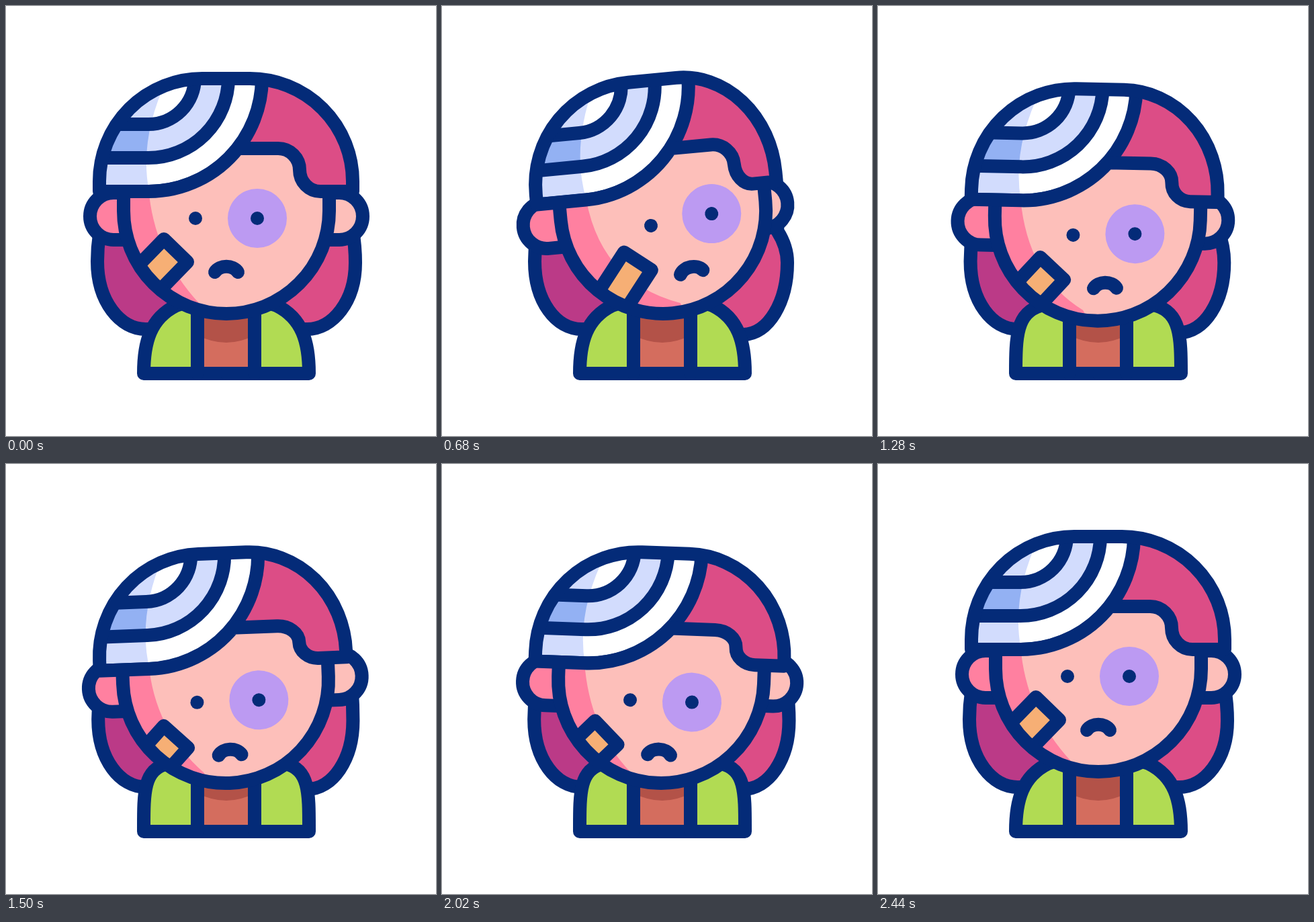
Write an HTML page with a canvas that moves like this. It is 640 by 640 pixels and loops after 2.6 s.

```html
<!DOCTYPE html>
<html lang="en">
<head>
<meta charset="utf-8">
<title>Injured girl</title>
<style>
  html, body { margin: 0; width: 100%; height: 100%; overflow: hidden; background: #fff; }
  canvas { display: block; width: 640px; height: 640px; }
</style>
</head>
<body>
<canvas id="stage" width="640" height="640"></canvas>
<script>
const LOOP = 2600;
const NAVY = '#042b78', SKIN = '#fdbfba', BLUSH = '#ff80a0', HAIR = '#dc4d86', HAIR_DARK = '#bb3a87';
const GREEN = '#b1db53', PALE = '#d2dcfd', BLUE = '#93b1f3';
const ctx = document.getElementById('stage').getContext('2d');

// Head motion as [ms, value]: turn to the side, nod down, roll in degrees
const YAW = [[100, 0], [700, 1], [960, 1], [1540, 0]];
const NOD = [[1000, 0], [1480, 1], [2010, 1], [2440, 0]];
const ROLL = [[100, 0], [700, -5.5], [960, -5.5], [1280, 1.3], [1700, -5.2], [2020, 2.1], [2440, 0]];

function ease(keys, t) {
  const i = keys.findIndex(k => k[0] > t);
  if (i < 0) return keys[keys.length - 1][1];
  if (i === 0) return keys[0][1];
  const [[t0, a], [t1, b]] = [keys[i - 1], keys[i]];
  const u = (t - t0) / (t1 - t0);
  return a + (b - a) * u * u * (3 - 2 * u);
}

function fill(d, color) {
  ctx.fillStyle = color;
  ctx.fill(new Path2D(d));
}

function line(d, color = NAVY, width = 20) {
  ctx.strokeStyle = color;
  ctx.lineWidth = width;
  ctx.stroke(new Path2D(d));
}

function shape(d, color) {
  fill(d, color);
  line(d);
}

function dot(x, y, r, color) {
  ctx.fillStyle = color;
  ctx.beginPath();
  ctx.arc(x, y, r, 0, 7);
  ctx.fill();
}

function group(x, y, deg, draw) {
  ctx.save();
  ctx.translate(x, y);
  ctx.rotate(deg * Math.PI / 180);
  draw();
  ctx.restore();
}

function clipped(d, draw) {
  ctx.save();
  ctx.clip(new Path2D(d));
  draw();
  ctx.restore();
}

function backHair(dx, dy, rightTop) {
  const l = 136 - dx / 3, r = 520 + dx, b = 481 + dy;
  shape(`M328 320H${l + 3}V340Q${l} 360 ${l} 380C${l} 440 170 481 208 481H328Z`, HAIR_DARK);
  shape(`M328 320H${rightTop}V335Q${r} 358 ${r} 382C${r} 440 486 ${b} 448 ${b}H328Z`, HAIR);
}

function ear(x, y, deg, side, color) {
  group(x, y, deg, () => {
    ctx.scale(side, 1);
    shape('M75 -35H35A35 35 0 0 0 35 35H75', color);
  });
}

function body(lift) {
  const top = 253 - 13 * lift, y1 = 500 - 10 * lift, x2 = 215 - 11 * lift, y2 = 465 - 10 * lift;
  const half = `M0 547H-123C-123 ${y1} ${x2 - 328} ${y2} ${top - 328} 446L-28 430H0`;
  for (const side of [1, -1]) {
    group(328, 0, 0, () => {
      ctx.scale(side, 1);
      shape(half, GREEN);
    });
  }
  fill('M285 430H370V537H285Z', '#d46d5e');
  fill('M285 430H370V490Q328 512 285 490Z', '#b35248');
  line('M285 440V547M370 440V547');
}

function look(x, y, deg, nod) {
  group(x, y, deg, () => {
    group(-4 * nod, 2 * nod, 0, () => shape('M-93 31L-58 65L-126 135L-161 101Z', '#f6af75'));
    dot(46, 0, 44, '#bc9af2');
    dot(46, 0, 10, NAVY);
    dot(-46, 0, 10, NAVY);
    line('M-17 80C-10 69 10 69 17 80');
  });
}

function face(x, y, deg, shade, drawLook) {
  const d = 'M-153 -100V0A153 153 0 0 0 153 0V-100';
  group(x, y, deg, () => {
    fill(d, SKIN);
    clipped(d, () => {
      ctx.setTransform(1, 0, 0, 1, 0, 0);
      fill(shade, BLUSH);
      drawLook();
    });
    line(d);
  });
}

const arc = r => `M100 ${107 + r}H212A${r} ${r} 0 0 0 ${212 + r} 107`;

function cap(x, y, deg, squeeze, droop) {
  const right = 516 - squeeze, tip = 468 - squeeze * .3;
  const a = 212 + droop * 1.1, b = 276 - droop * .9, h = (b - a) / 2;
  const dome = `M139 276V261A153 153 0 0 1 292 108H363A${153 - squeeze} 153 0 0 1 ${right} 261V${b}` +
    `H${tip}A${tip - 437} ${h} 0 0 1 437 ${a + h}A32 ${h} 0 0 0 405 ${a}` +
    `H${345 - droop * .8}A169 169 0 0 1 212 276Z`;
  const shade = 'M240 108Q197.5 198 213 276H100V100Z';
  group(x, y, deg, () => {
    ctx.translate(-328, -276);
    fill(dome, HAIR);
    clipped(dome, () => {
      fill(arc(169) + 'H100Z', '#fff');
      fill(shade, PALE);
      line(arc(94), PALE, 50);
      clipped(shade, () => line(arc(94), BLUE, 50));
      for (const r of [69, 119, 169]) line(arc(r));
    });
    line(dome);
  });
}

function draw(t) {
  const yaw = ease(YAW, t), nod = ease(NOD, t), roll = ease(ROLL, t);
  const capY = 276 + 1.5 * yaw + 24.5 * nod;
  const earL = 125 - 8 * yaw - 3.5 * nod - .7 * roll;
  const earR = 531 - 19 * yaw - 2 * nod - .4 * roll;
  const cheek = 52 * yaw - 2.9 * roll;
  const shade = `M212 ${capY - 6}Q${220 + cheek * .15} ${370 + 40 * yaw + 25 * nod} ` +
    `${287 + cheek} ${442 + 17 * nod}L${307 + cheek} 490H100V${capY - 6}Z`;

  ctx.fillStyle = '#fff';
  ctx.fillRect(0, 0, 640, 640);
  backHair(-6 * yaw - 3.5 * nod, 8 * yaw + 3 * nod, earR - 15);
  ear(earL, 313 + yaw + 16 * nod - 2.8 * roll, roll, 1, BLUSH);
  ear(earR, 313 - 5 * yaw + 8 * nod + 2.8 * roll, roll, -1, SKIN);
  body(Math.min(1, nod * 1.3));
  face(328 - 1.5 * nod - .2 * roll, 305 + 17 * nod, roll, shade, () =>
    look(328 + 23 * yaw - .95 * roll, 316 + 2 * yaw + 37 * nod, roll - 5.7 * yaw, nod));
  cap(328 - .25 * roll, capY, roll, 15 * yaw + 8 * nod - .7 * roll, 7 * nod);
}

function tick() {
  draw(performance.now() % LOOP);
  requestAnimationFrame(tick);
}

ctx.lineCap = ctx.lineJoin = 'round';
tick();
</script>
</body>
</html>
```
